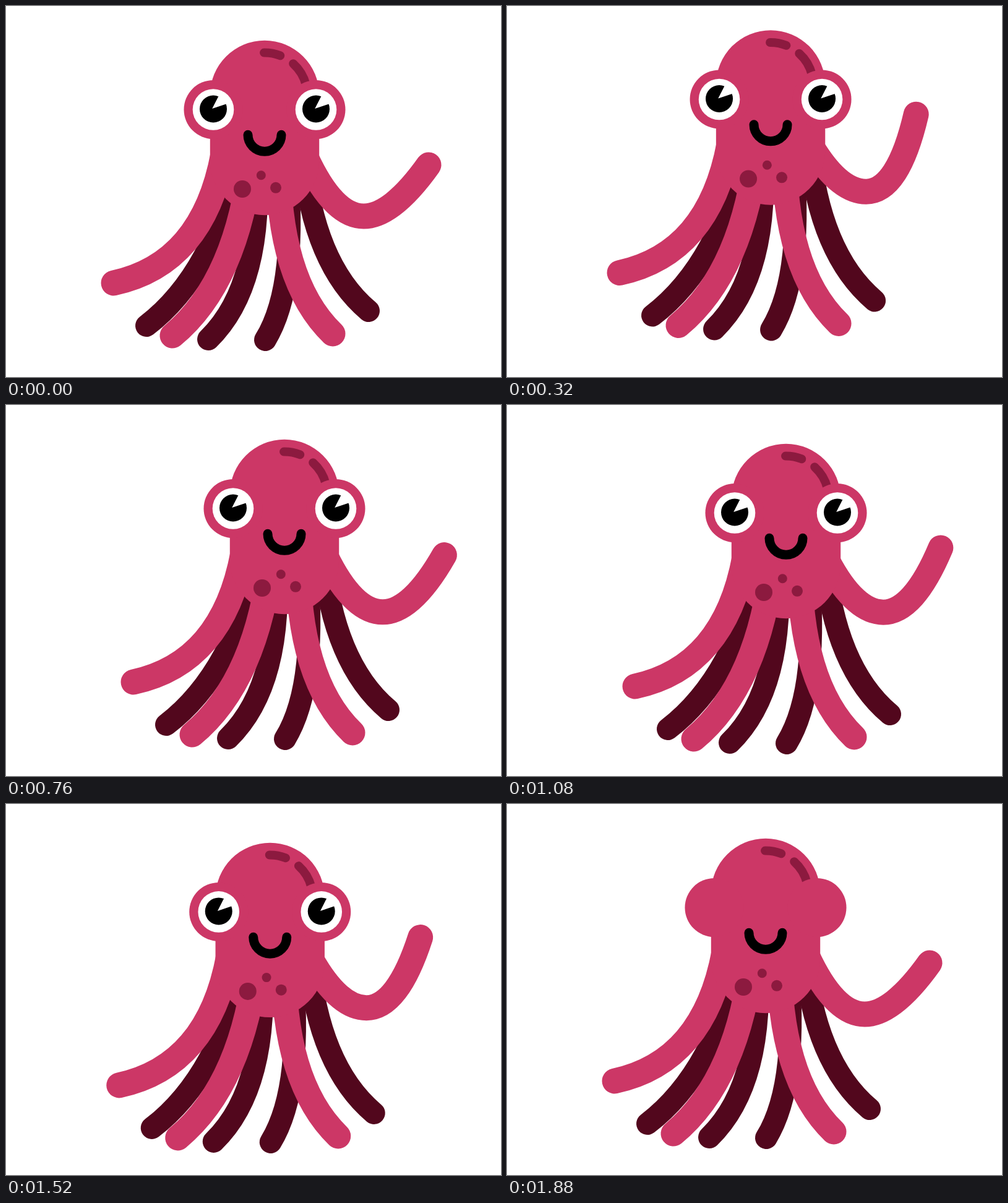
An HTML page with a canvas for the animation above (1.92 s loop, 800 by 600 pixels).

```html
<!DOCTYPE html>
<html lang="en">
<head>
<meta charset="utf-8">
<title>Waving octopus</title>
<style>
  html, body { margin: 0; width: 100%; height: 100%; overflow: hidden; background: #fff; }
  canvas { display: block; width: 800px; height: 600px; }
</style>
</head>
<body>
<canvas id="stage" width="800" height="600"></canvas>
<script>
const ctx = document.getElementById('stage').getContext('2d');
const LOOP = 1920, STEP = 40, TURN = 760, BLINK = 1880;
const PINK = '#cc3766', DARK = '#52071d', MARK = '#8c1a3f';
const DEG = Math.PI / 180, HIP = 240, CX = 418;

const bezier = (a, b, c, d, s) => {
  const r = 1 - s;
  return r * r * r * a + 3 * r * r * s * b + 3 * r * s * s * c + s * s * s * d;
};
const mix = (a, b, u) => a + (b - a) * u;
const ease = u => u * u * (3 - 2 * u);

// The body drifts right along an upper arc and back along a lower one
function sway(t) {
  if (t < TURN) {
    const s = ease(t / TURN);
    return [bezier(0, 0.5, 22.3, 32, s), bezier(0, -23.3, -23.3, 0, s)];
  }
  const s = ease(Math.min(1, (t - TURN) / (BLINK - TURN)));
  return [bezier(32, 41.6, 6.4, 0, s), bezier(0, 15.5, 11.5, 0, s)];
}

// 0 = arm lowered, 1 = arm raised
function wave(t) {
  if (t < 380) return ease(t / 380);
  if (t < 868) return 1 - bezier(0, 0, 0.8, 1, (t - 380) / 488);
  if (t < 1308) return ease((t - 868) / 440);
  return 1 - ease(Math.min(1, (t - 1308) / (BLINK - 1308)));
}

function stroke(color, width) {
  ctx.strokeStyle = color;
  ctx.lineWidth = width;
  ctx.stroke();
}

function disc(x, y, r, color) {
  ctx.beginPath();
  ctx.arc(x, y, r, 0, 360 * DEG);
  ctx.fillStyle = color;
  ctx.fill();
}

function arc(y, r, from, to, color, width) {
  ctx.beginPath();
  ctx.arc(CX, y, r, from * DEG, to * DEG);
  stroke(color, width);
}

// Wide legs bend lower down
function leg(color, root, bend, tipX, tipY) {
  const height = tipY - HIP;
  const drop = Math.max(0.7, Math.abs(tipX - root) / height);
  ctx.beginPath();
  ctx.moveTo(root, HIP);
  ctx.quadraticCurveTo(bend, HIP + drop * height, tipX, tipY);
  stroke(color, color === DARK ? 36 : 41);
}

function arm(up) {
  const low = mix(340, 315, up);
  ctx.beginPath();
  ctx.moveTo(485, 245);
  ctx.quadraticCurveTo(529, low, mix(578, 572, up), low);
  ctx.quadraticCurveTo(624, low, mix(683, 651, up), mix(257, 187, up));
  stroke(PINK, 41);
}

function eye(x, open) {
  disc(x, 167.5, 47.5, PINK);
  if (!open) return;
  disc(x, 167.5, 33.3, '#fff');
  disc(x, 166.5, 22, '#000');
  ctx.beginPath();
  ctx.moveTo(x - 1.8, 166);
  ctx.arc(x - 1.8, 166, 27, -63 * DEG, -18.5 * DEG);
  ctx.fillStyle = '#fff';
  ctx.fill();
}

function head() {
  ctx.beginPath();
  ctx.arc(CX, 144, 88.2, Math.PI, 0);
  ctx.arc(CX, 250, 88.2, 0, Math.PI);
  ctx.fillStyle = PINK;
  ctx.fill();
  arc(144.5, 69, -90.8, -68.5, MARK, 14);
  arc(144.5, 69, -48, -14, MARK, 14);
  disc(382, 296, 14, MARK);
  disc(412.3, 273.7, 7.5, MARK);
  disc(436, 293.8, 9, MARK);
}

function draw(t) {
  ctx.setTransform(1, 0, 0, 1, 0, 0);
  ctx.fillStyle = '#fff';
  ctx.fillRect(0, 0, 800, 600);
  ctx.translate(...sway(t));
  ctx.lineCap = 'round';

  leg(DARK, 380, 336, 227, 517);
  leg(DARK, 403, 419, 327, 539);
  leg(DARK, 452, 474, 419, 540);
  leg(DARK, 480, 496, 586, 493);
  leg(PINK, 351, 318, 174, 448);
  leg(PINK, 397, 375, 269, 533);
  leg(PINK, 440, 438, 528, 530);
  arm(wave(t));

  head();
  for (const side of [-1, 1]) eye(CX + side * 83, t < BLINK);
  arc(208.3, 27, 0, 180, '#000', 15);
}

const begin = performance.now();
function tick() {
  const t = (performance.now() - begin) % LOOP;
  draw(Math.floor(t / STEP) * STEP);
  requestAnimationFrame(tick);
}
tick();
</script>
</body>
</html>
```
